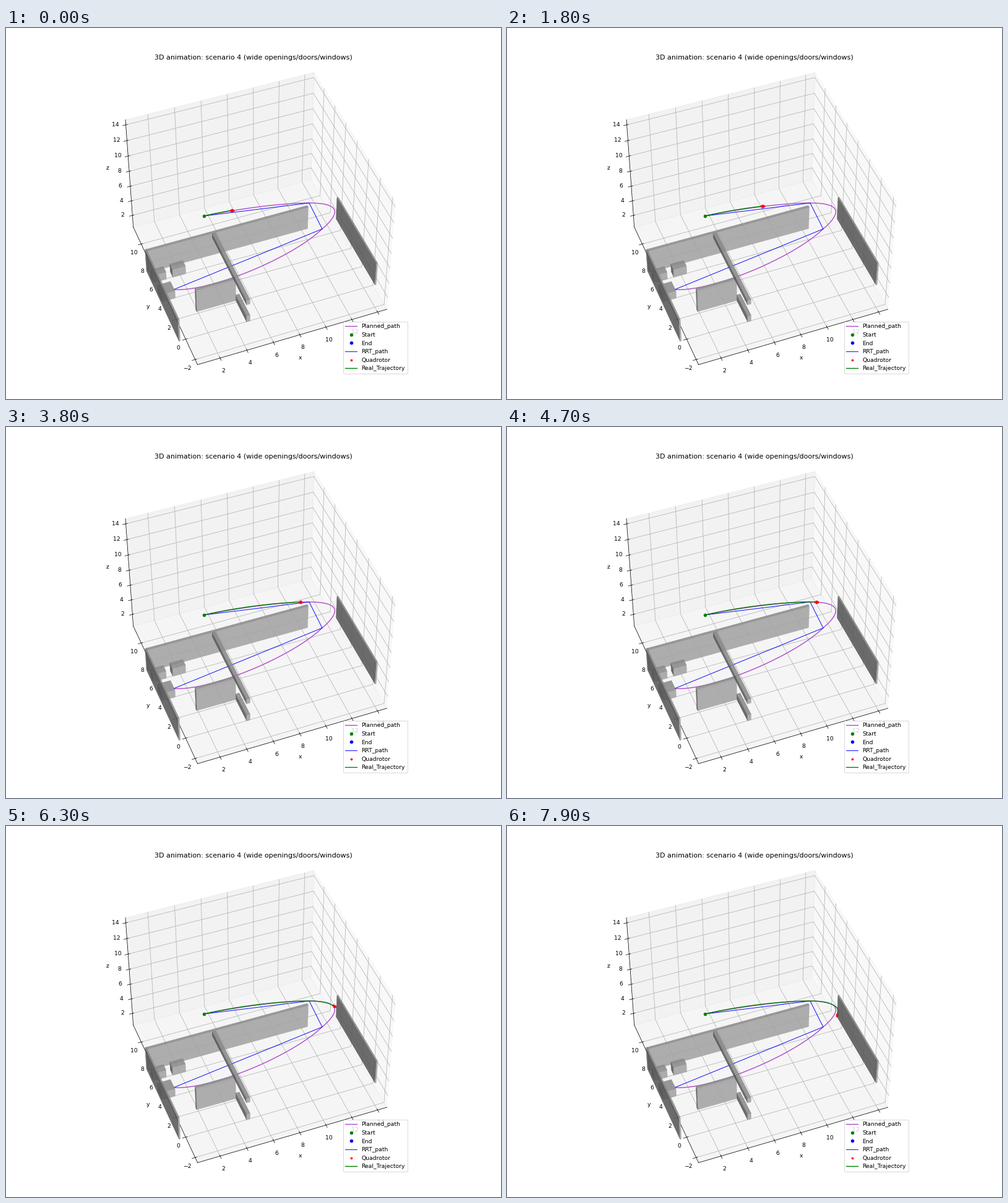
Recreate the animation shown at these times as a matplotlib script. Size 800 px wide and 600 px high, loop 8 s.

```python
import numpy as np
import matplotlib.pyplot as plt
from matplotlib.animation import FuncAnimation
from matplotlib.lines import Line2D
from matplotlib.transforms import Affine2D
from mpl_toolkits.mplot3d.art3d import Poly3DCollection

W, H, FRAMES = 800, 600, 80
PURPLE = "#b048cc"
LEFT, FRONT, TOP = 0.34, 0.64, 0.54  # grey of each visible side

fig = plt.figure(figsize=(12, 9), dpi=W / 12, facecolor="white")
ax = fig.add_axes([0.181, 0.0603, 0.6355, 0.8473], projection="3d",
                  elev=45, azim=-111, computed_zorder=False)
ax.set(xlabel="x", ylabel="y", zlabel="z")
ax.set_xticks(range(2, 15, 2))
ax.set_yticks(range(-2, 11, 2))
ax.set_zticks(range(2, 15, 2))
ax.set_xlim(0.33, 14.73)
ax.set_ylim(-2.5, 11.9)
ax.set_zlim(0.36, 14.64)
fig.text(0.4995, 1 - 51 / H, "3D animation: scenario 4 (wide openings/doors/windows)",
         fontsize=12, ha="center")

# stage pixels, counted from the top left
stage = Affine2D().scale(1 / W, -1 / H).translate(0, 1) + fig.transFigure


def block(x, y, z, dx, dy, dz):
    """Box with the three sides that face the camera."""
    p = np.array([x, y, z], float)
    i, j, k = np.diag([dx, dy, dz]).astype(float)
    sides = [(LEFT, j, k, 0 * i), (FRONT, i, k, 0 * j), (TOP, i, j, k)]
    faces = [[p + o, p + o + a, p + o + a + b, p + o + b] for _, a, b, o in sides]
    colors = [(g, g, g, 0.88) for g, *_ in sides]
    ax.add_collection3d(Poly3DCollection(faces, facecolors=colors, edgecolors=colors,
                                         linewidths=0.4, zorder=3))


def bezier(a, b, c, d, n=150):
    t = np.linspace(0, 1, n)[:, None]
    a, b, c, d = np.array([a, b, c, d], float)
    return (1 - t) ** 3 * a + 3 * t * (1 - t) ** 2 * b + 3 * t * t * (1 - t) * c + t ** 3 * d


def draw(points, **style):
    line = Line2D(*np.transpose(points), transform=stage, **style)
    ax.add_artist(line)
    return line


# a room of 15 by 7.5 with walls 3 high, drawn from back to front
block(15, 0.2, 0, 0.1, 7.3, 3)
block(0, 7.3, 0, 12.6, 0.2, 3)
block(0, 6.2, 0, 1, 0.6, 1)
block(1.5, 6.2, 0, 1, 0.6, 1.1)
block(0, 4.2, 0, 1, 1, 1)
block(-0.1, 0.2, 0, 0.1, 7.3, 3)
block(2, 2.4, 0, 3, 0.2, 3)
block(5, 0.2, 0, 0.27, 2.2, 0.8)
block(5, 0.2, 2.4, 0.27, 7.1, 0.6)

# waypoints and the smooth paths through them
start, turn, back, end = (320, 304), (490, 283), (511, 325), (271, 423)
planned = np.vstack([bezier(start, (375, 292.5), (445, 283), turn),
                     bezier(turn, (542, 283), (540, 300), back),
                     bezier(back, (462, 372), (330, 427), end)])
flight = np.vstack([bezier(start, (373, 291.5), (445, 282.7), turn),
                    bezier(turn, (528, 283), (541, 295), (533, 306))])
length = np.concatenate([[0], np.cumsum(np.hypot(*np.diff(flight, axis=0).T))])

draw(planned, color=PURPLE, lw=1.5, zorder=2)
draw([start, turn, back, end], color="blue", lw=1, zorder=2.1)
trail = draw([start], color="green", lw=1.5, zorder=2.2)
draw([start], color="green", marker="o", ms=5, zorder=2.3)
drone = draw([start], color="red", marker=".", ms=6, ls="", zorder=2.4)

handles = [
    Line2D([], [], color=PURPLE, lw=1.5, label="Planned_path"),
    Line2D([], [], color="green", marker="o", ms=5, ls="", label="Start"),
    Line2D([], [], color="blue", marker="o", ms=5, ls="", label="End"),
    Line2D([], [], color="blue", lw=1, label="RRT_path"),
    Line2D([], [], color="red", marker=".", ms=6, ls="", label="Quadrotor"),
    Line2D([], [], color="green", lw=1.5, label="Real_Trajectory"),
]
ax.legend(handles=handles, loc="lower right").set_zorder(5)


def travelled(frame):
    """Distance flown: speeds up first, then slows down for the bend."""
    k = np.pi / 60
    return 46 + 1.9 * frame + 24.9 * (np.sin(k * (frame - 26)) + np.sin(k * 26))


def along(s):
    return np.column_stack([np.interp(s, length, flight[:, i]) for i in (0, 1)])


def update(frame):
    path = along(np.linspace(0, travelled(frame), 200))
    trail.set_data(*path.T)
    ahead = path[-1] - path[-2]
    ahead *= 1.8 / np.hypot(*ahead)
    side = np.array([-ahead[1], ahead[0]]) / 2
    drone.set_data(*(path[-1] + [ahead, -ahead, side, -side]).T)
    return trail, drone


anim = FuncAnimation(fig, update, frames=FRAMES, interval=100, repeat=True,
                     repeat_delay=0)
plt.show()
```
